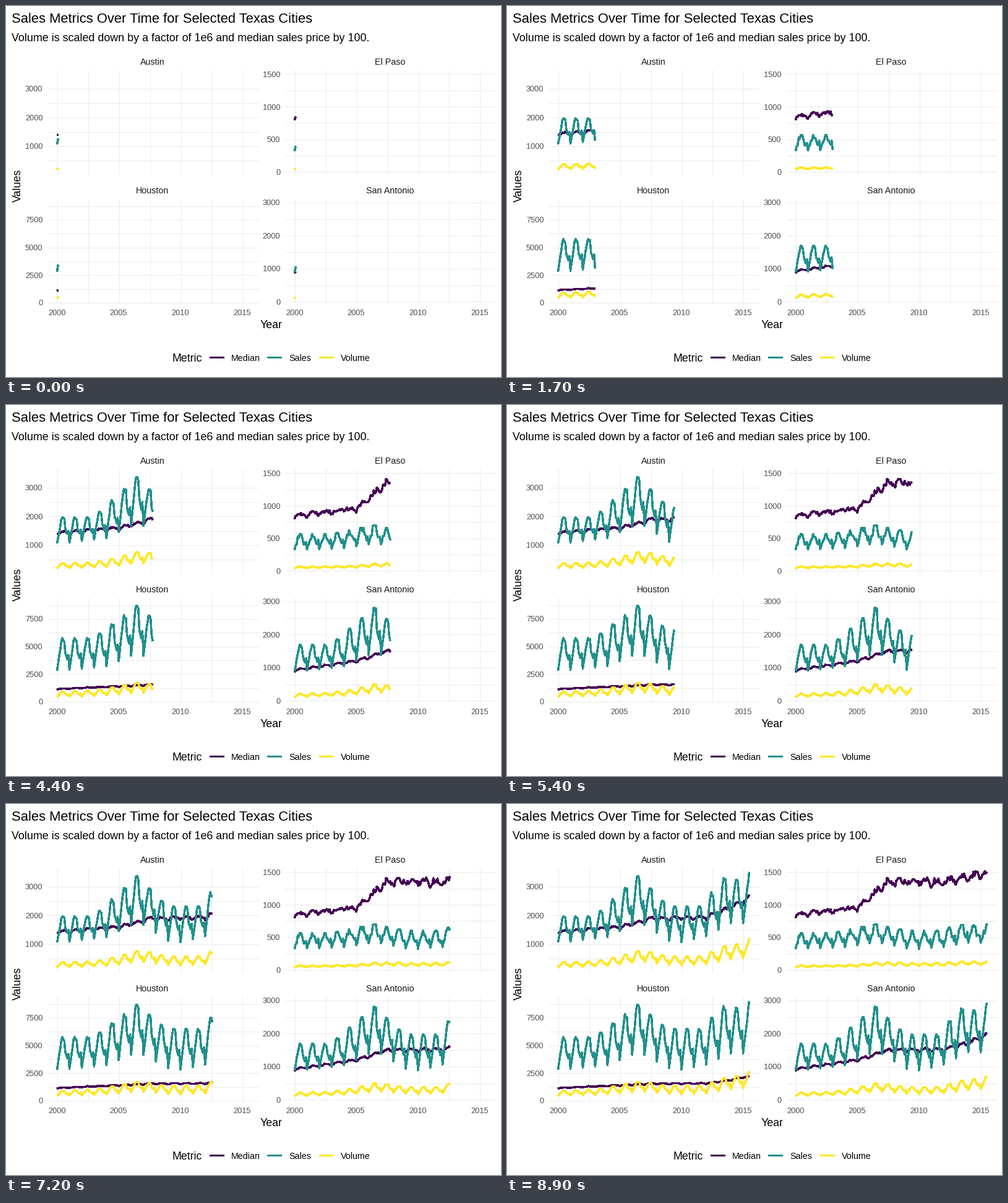
Write a matplotlib script that moves like this. It is 800 px wide and 600 px high and loops after 10 s.

```python
import numpy as np
import matplotlib.pyplot as plt
from matplotlib.animation import FuncAnimation

W, H, DPI = 800, 600, 100
PT = 72 / DPI                      # points per pixel
MONTHS = 187
FRAMES, MOVING, INTERVAL = 100, 90, 100
FIRST, PACE = 1.08, 2.0803         # first month reached, months per frame
YEAR_PX = 19.93
PURPLE, TEAL, YELLOW = "#440154", "#21908C", "#FDE725"
GRID, TICK, STRIP = "#EBEBEB", "#4D4D4D", "#1A1A1A"

plt.rcParams["font.family"] = "Liberation Sans"

month = np.arange(MONTHS)
year, m = month // 12, month % 12

# Shared market cycle: 0 at the start, 1 at the 2006 boom
SUMMER = np.interp(np.arange(16), [0, 2, 3, 6, 8, 9, 11, 13, 14, 15],
                   [0, 0, .14, 1, .38, .25, .25, .95, .9, 1.1])
WINTER = np.interp(np.arange(17), [0, 1, 4, 6, 7, 9, 10, 12, 14],
                   [0, .05, .3, 1, 1, .1, 0, .35, 1.1])
# Share of the January-to-peak rise reached in each month
SEASON = np.interp(m, [0, 4, 5, 7, 8, 10, 11], [0, .87, 1, .93, .55, .33, .48])
SEASON[-7:] = np.linspace(0, 1, 7)
MEDIAN_YEARS = [0, 5, 7.5, 12, 14, 15.5]


def build_series(low, peak, median, rough, wobble, price, seed):
    """Median price, sales and volume by month; low and peak are (start, boom)."""
    rng = np.random.default_rng(seed)
    floor = low[0] + (low[1] - low[0]) * WINTER
    top = peak[0] + (peak[1] - peak[0]) * SUMMER
    base = floor[year] + np.diff(floor)[year] * np.clip((m - 6) / 6, 0, 1)
    noise = rng.uniform(-rough, rough, MONTHS) * SEASON * (SEASON < 1)
    sales = base + (top[year] - base) * np.minimum(SEASON + noise, 1)

    trend = np.interp(month / 12, MEDIAN_YEARS, median)
    wave = 1 + .07 * np.sin(np.pi * m / 12)
    price_path = trend * (wave + rng.uniform(-wobble, wobble, MONTHS))
    return price_path, sales, sales * price_path * 1e-4 * price


fig = plt.figure(figsize=(W / DPI, H / DPI), dpi=DPI, facecolor="white")
ax = fig.add_axes([0, 0, 1, 1])
ax.set_xlim(0, W)
ax.set_ylim(H, 0)
ax.axis("off")


def text(x, y, s, px, color="black", **kw):
    ax.text(x, y, s, fontsize=px * PT, color=color, **kw)


def line(xs, ys, color, width):
    return ax.plot(xs, ys, color=color, lw=width * PT, antialiased=False,
                   solid_capstyle="butt", solid_joinstyle="round")[0]


def grid_line(xs, ys):
    line(np.round(xs) + .5, np.round(ys) + .5, GRID, 1)


curves = []


def add_panel(name, x0, top, zero, scale, step, ticks, halves, **data):
    """Facet with gridlines every half step; x0 is the place of year 2000."""
    left, right, bottom = x0 - 15.4, x0 + 324.4, top + 168.4
    for k in halves:
        y = zero - k * step / 2 * scale
        grid_line([left, right], [y, y])
    for k in range(7):
        x = x0 + 2.5 * k * YEAR_PX
        grid_line([x, x], [top, bottom])
    for k in ticks:
        text(left - 7.5, zero - k * step * scale + 5.5, str(k * step), 12.7,
             TICK, ha="right")
    text((left + right) / 2, top - 8, name, 14.3, STRIP, ha="center")
    for values, color in zip(build_series(**data), (PURPLE, TEAL, YELLOW)):
        curves.append((line([], [], color, 2.5),
                       x0 + .3 + month / 12 * YEAR_PX, zero - values * scale))


LEFT, RIGHT, UPPER, LOWER = 82.3, 466.2, 103, 311
add_panel("Austin", LEFT, UPPER, 272.4, .0465, 1000, range(1, 4), range(1, 7),
          low=(1050, 1650), peak=(1950, 3350),
          median=(1350, 1500, 1780, 1840, 2150, 2500),
          rough=.06, wobble=.02, price=1.25, seed=0)
add_panel("El Paso", RIGHT, UPPER, 267.3, .1053, 500, range(4), range(7),
          low=(315, 400), peak=(560, 690),
          median=(800, 910, 1290, 1290, 1360, 1410),
          rough=.3, wobble=.035, price=1.2, seed=1)
add_panel("Houston", LEFT, LOWER, 479, .01787, 2500, range(4), range(8),
          low=(2780, 4100), peak=(5700, 8650),
          median=(1050, 1300, 1430, 1450, 1760, 2080),
          rough=.06, wobble=.02, price=1.32, seed=2)
add_panel("San Antonio", RIGHT, LOWER, 477.3, .0535, 1000, range(4), range(7),
          low=(870, 1370), peak=(1680, 2800),
          median=(860, 1130, 1410, 1440, 1620, 1860),
          rough=.08, wobble=.02, price=1.22, seed=3)

for x0 in (LEFT, RIGHT):
    for k in range(0, 16, 5):
        text(x0 + k * YEAR_PX, 500, str(2000 + k), 12.7, TICK, ha="center")

text(9, 27, "Sales Metrics Over Time for Selected Texas Cities", 22)
text(9, 57, "Volume is scaled down by a factor of 1e6 and "
            "median sales price by 100.", 17.9)
text(24, 290.5, "Values", 17.9, rotation=90, rotation_mode="anchor",
     ha="center", va="baseline")
text(429, 521, "Year", 17.9, ha="center")
text(268, 575, "Metric", 17.7)
for x, label, color in ((329, "Median", PURPLE), (422, "Sales", TEAL),
                        (506, "Volume", YELLOW)):
    line([x, x + 23], [567.5, 567.5], color, 3)
    text(x + 35, 574, label, 14.3)


def update(frame):
    shown = round(FIRST + PACE * min(frame, MOVING - 1)) + 1
    for curve, xs, ys in curves:
        curve.set_data(xs[:shown], ys[:shown])
    return [c[0] for c in curves]


anim = FuncAnimation(fig, update, frames=FRAMES, interval=INTERVAL,
                     repeat=True, repeat_delay=0, blit=False)
plt.show()
```
